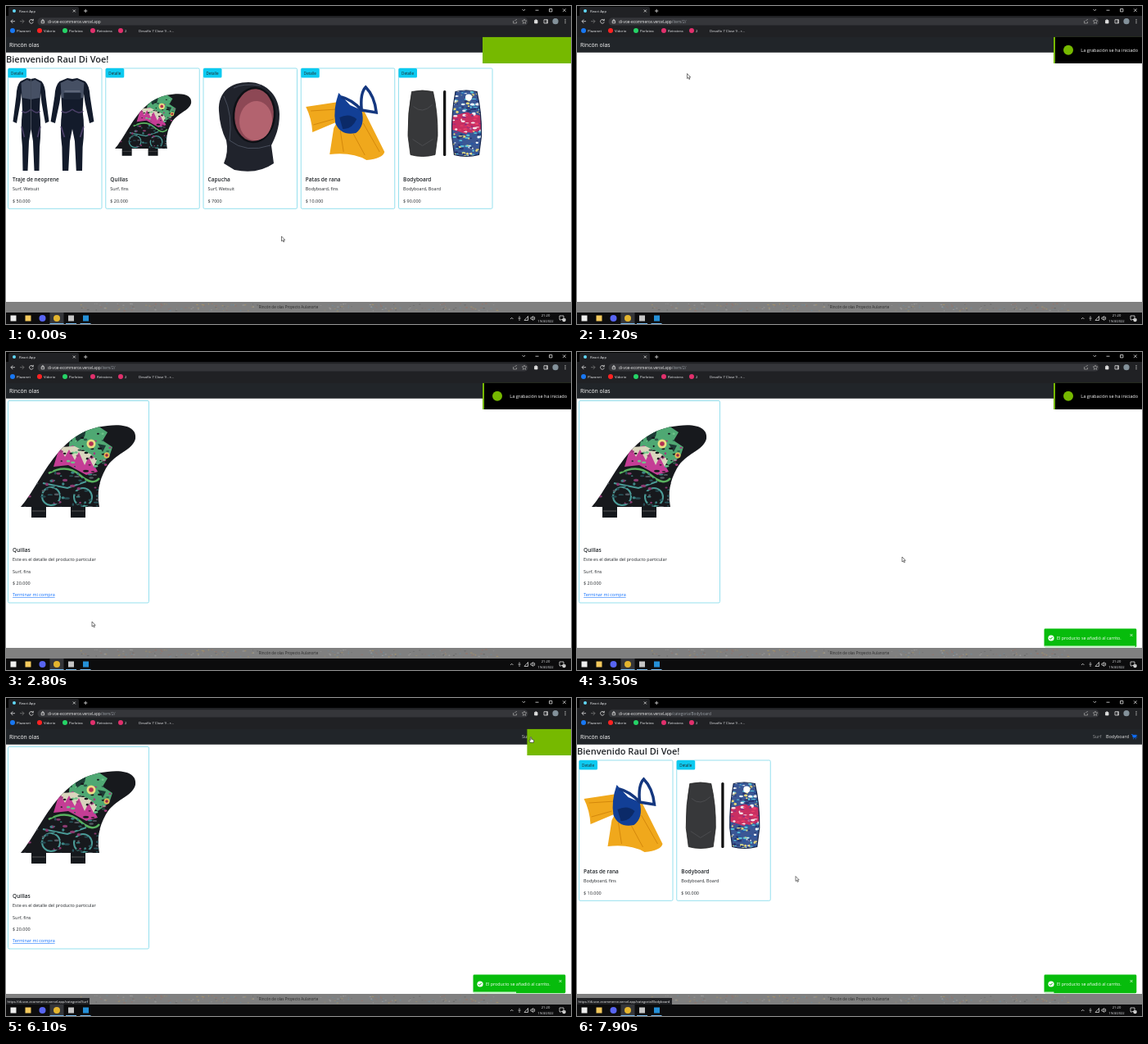
An HTML page for the animation above (8000 ms loop, 690 by 388 pixels).

```html
<!DOCTYPE html>
<html lang="es">
<head>
<meta charset="utf-8">
<title>Shop demo</title>
<style>
  html, body { margin: 0; width: 100%; height: 100%; overflow: hidden; background: #fff; }
  svg { display: block; width: 690px; height: 388px; }
  text { font-family: "Open Sans", "Noto Sans", sans-serif; white-space: pre; }
  .line { fill: none; stroke: #ddd; stroke-width: .8; }
</style>
</head>
<body>
<svg viewBox="0 0 690 388" xmlns="http://www.w3.org/2000/svg">
  <defs>
    <path id="finShape" d="M18 189C44 160 62 95 124 90C148 87 160 94 158 106C154 121 133 123 122 142C113 158 111 172 114 189Z"/>
    <clipPath id="finClip"><use href="#finShape"/></clipPath>
    <path id="board" d="M5 2Q18 -1 31 2Q37 28 36.500 56L33.500 79Q18 83 3.500 79L.5 56Q0 28 5 2Z"/>
    <clipPath id="boardClip"><use href="#board"/></clipPath>

    <g id="suitHalf">
      <path fill="#131b2b" d="M0 89L5 88L13 92Q17.500 97 18 110L22 141L17.500 143L13 118L11.500 106L10.500 128Q13 150 10.500 172L10 201H4L2.500 165L0 150Z"/>
      <path fill="#465064" d="M0 92L5 90L12 94L11 112L0 114Z"/>
      <path fill="none" stroke="#4b4068" stroke-width="1.500" d="M0 126Q7 133 11 128M11.500 147L8 160"/>
    </g>
    <g id="suit"><use href="#suitHalf"/><use href="#suitHalf" transform="scale(-1 1)"/></g>

    <g id="wetsuit">
      <use href="#suit" transform="translate(28)"/>
      <use href="#suit" transform="translate(78.500) scale(1.200 1)"/>
      <path fill="#1d2636" d="M68 106h21v8H68z"/>
      <path fill="none" stroke="#9aa3b0" stroke-width=".6" d="M69 104h19"/>
    </g>

    <g id="fin">
      <path fill="#15181c" d="M31 188h18v14H31zM79 188h18v14H79z"/>
      <path stroke="#555" d="M32 194h16M80 194h16"/>
      <use href="#finShape" fill="#17191d"/>
      <g clip-path="url(#finClip)">
        <path fill="#4fa873" d="M78 106L92 92L112 90L124 98L118 108L130 116L126 128L112 138L96 126L76 122Z"/>
        <path fill="#1d3b35" d="M84 100L98 94L96 103L86 110ZM112 112L122 114L118 122Z"/>
        <path fill="#c43d95" d="M64 120L82 114L104 132L112 146L98 150L76 138L58 140Z"/>
        <path fill="#d9d5bd" d="M66 116L72 128L77 119L84 132L89 122L96 138L101 128L107 140L111 132L104 125L84 115Z"/>
        <path fill="none" stroke="#58b15f" stroke-width="2.500" d="M52 148Q74 136 90 150T114 154"/>
        <g fill="none" stroke="#4a9b97" stroke-width="2">
          <circle cx="55" cy="176" r="11"/><circle cx="94" cy="177" r="11"/><path d="M45 160L75 166L98 158"/>
        </g>
        <g id="finArt"></g>
        <circle cx="104" cy="112" r="5.500" fill="#eadf83"/><circle cx="104" cy="112" r="2.800" fill="#b33155"/>
        <circle cx="123" cy="126" r="3.500" fill="#e5ba55"/><circle cx="123" cy="126" r="1.800" fill="#9a2448"/>
      </g>
    </g>

    <g id="hood">
      <path fill="#20232c" d="M19 128C18 104 34 93 55 93C79 93 93 112 93 132C93 149 88 160 83 170L86 192Q66 206 38 200L25 192Q31 178 28 164Q20 148 19 128Z"/>
      <ellipse cx="62" cy="133" rx="25" ry="33" transform="rotate(5 62 133)" fill="#8d4855" stroke="#0e1015" stroke-width="2.500"/>
      <ellipse cx="64" cy="140" rx="20" ry="24" transform="rotate(5 64 140)" fill="#b3636f"/>
      <path fill="none" stroke="#596070" stroke-width=".7" d="M25 110Q36 132 32 164Q52 180 82 170M37 100Q48 94 70 97"/>
    </g>

    <g id="flippers">
      <path fill="#f0a81c" d="M6 123L46 117L52 138L14 154Q13 137 6 123Z"/>
      <path fill="#f0a81c" d="M40 149L50 130L77 128L102 178Q100 186 80 188Q63 178 35 181Z"/>
      <path fill="none" stroke="#d4880b" d="M12 128L44 126M15 145L40 138M48 152L52 178M76 143L96 178M64 156L78 182"/>
      <path fill="#123f96" d="M46 106L60 121L74 127Q79 146 67 155Q49 159 42 143Q39 126 46 106Z"/>
      <path fill="none" stroke="#14377f" stroke-width="3.500" d="M49 111Q62 114 74 127L92 130Q90 110 79 99Q72 106 74 127"/>
      <path fill="#0b2a68" d="M47 136Q59 130 68 138Q62 151 51 150Z"/>
    </g>

    <g id="boards">
      <g transform="translate(11 102.500)">
        <use href="#board" fill="#37383a" stroke="#222" stroke-width=".8"/>
        <path fill="none" stroke="#4b4c4f" d="M7 20Q18 30 30 18M6 60L18 68L31 60"/>
      </g>
      <rect x="54.500" y="103" width="3.300" height="80" rx="1.500" fill="#111"/>
      <g transform="translate(64.500 102.500)">
        <g clip-path="url(#boardClip)">
          <path fill="#3b5794" d="M0 0h38v84H0z"/>
          <path fill="#c92f62" d="M0 32L19 27L38 32V48L19 54L0 48Z"/>
          <g id="dye"></g>
          <circle cx="21" cy="9" r="4" fill="#fff"/>
        </g>
        <use href="#board" fill="none" stroke="#17264b" stroke-width="1.200"/>
      </g>
    </g>
  </defs>

  <rect width="690" height="388" fill="#fff"/>
  <g id="home"></g>
  <g id="detail"></g>
  <g id="category"></g>

  <rect y="361" width="690" height="13" fill="#808080"/>
  <g id="confetti" opacity=".6"></g>

  <g id="toast">
    <rect x="570.500" y="337.500" width="112.800" height="22.700" rx="1.400" fill="#07bc0c"/>
    <circle cx="579" cy="349" r="3.600" fill="#fff"/>
    <path d="M577.200 349l1.300 1.400 2.300-2.700" fill="none" stroke="#07bc0c"/>
    <path d="M675.500 344l3 3m0-3l-3 3" stroke="#d5f5d6" stroke-width=".8"/>
    <rect id="progress" x="570.500" y="358.500" height="1.800" fill="#fff" opacity=".8"/>
  </g>

  <g id="chrome">
    <path fill="#000" d="M0 0h690v13H0z"/>
    <path fill="#202124" d="M0 12H3V3Q3 1 5 1H87Q89 1 89 3V12H690V38H0Z"/>
    <rect x="38.500" y="14.300" width="599" height="9.200" rx="4.600" fill="#35363a"/>
    <path fill="#212529" d="M0 38h690v18.800H0z"/>
    <g class="line">
      <path d="M11 18.700H6M8.300 16.300L6 18.700l2.300 2.400"/>
      <path stroke="#777" d="M17 18.700h5M19.700 16.300L22 18.700l-2.300 2.400"/>
      <path d="M33 17.500a2.400 2.400 0 1 0 .3 2M33.300 15.800v2h-2"/>
      <path d="M43.200 18.200h3.400v2.600h-3.400zM44 18v-1q.9-1.200 1.800 0v1"/>
      <path d="M81.800 4.500l3 3m0-3l-3 3M95 6h4.400M97.200 3.800v4.400"/>
      <path d="M630.500 4l1.700 1.700L634 4M646.500 5.200h4M663.500 3.500h3.400v3.400h-3.400zM680 3.400l3.700 3.700m0-3.700l-3.700 3.700"/>
      <path stroke="#999" d="M619.500 18v3h4v-2M621 18.500q1-2 3-2"/>
      <path stroke="#999" d="M633 16l.8 1.800 2 .2-1.500 1.400.4 2-1.700-1-1.700 1 .4-2-1.500-1.400 2-.2z"/>
      <path fill="#ddd" d="M645.500 17.500h1.200v-.8h1v.8h1.300v3.500h-3.500z"/>
      <path d="M657 16.700h4.500v4.300H657zM660.200 16.700v4.300"/>
    </g>
    <circle cx="671" cy="18.700" r="3.600" fill="#83919a"/>
    <g fill="#ddd"><circle cx="683" cy="16.700" r=".6"/><circle cx="683" cy="18.700" r=".6"/><circle cx="683" cy="20.700" r=".6"/></g>
  </g>
  <text x="51" y="20.600" font-size="4.740" fill="#eee">di-voe-ecommerce.vercel.app<tspan id="path" fill="#9aa0a6"></tspan></text>
  <text id="navSurf" x="630" y="49.300" font-size="5.450" fill="#fff">Surf</text>
  <text id="navBody" x="646" y="49.300" font-size="5.450" fill="#fff">Bodyboard</text>
  <path d="M677 44.500h1.300l.8 3.600h3.200l.7-2.800h-4.300" fill="#0d6efd" stroke="#0d6efd" stroke-width=".7"/>
  <path d="M679 49.700h.8m2 0h.8" stroke="#0d6efd"/>

  <path fill="#0c0c0d" d="M0 374h690v14H0z"/>
  <path fill="#35363a" d="M53.500 374h17v14h-17z"/>
  <path stroke="#76b9ed" d="M53.500 387.500h17M73 387.500h13M90.500 387.500h13"/>
  <g id="icons"></g>
  <g class="line">
    <path d="M616 382l1.700-1.700 1.700 1.700M627 378.500v3M625.500 381q1.500 2.500 3 0M627 383v1"/>
    <path d="M633 383.500h4.500v-5zM641 380h1.200l1.500-1.500v5l-1.500-1.500H641zM645 379q1.500 2 0 4M676 378h5v4.500h-3l-1 1v-1h-1z"/>
  </g>
  <circle cx="681.500" cy="383" r="2.200" fill="#ddd"/>
  <g id="labels"></g>

  <g id="status">
    <rect id="statusBox" y="366" height="8" fill="#202124"/>
    <text id="statusText" x="1.500" y="371.600" font-size="4.100" fill="#f1f1f1"></text>
  </g>

  <svg x="582" y="37.700" width="108" height="32.300" viewBox="0 0 108 32.300">
    <rect id="green" width="108" height="32.300" fill="#76b900"/>
    <g id="black">
      <rect x="2" width="106" height="32.300" fill="#000"/>
      <circle cx="18" cy="16" r="6" fill="#76b900"/>
      <text x="33.300" y="18.500" font-size="5.570" fill="#fff">La grabación se ha iniciado</text>
    </g>
  </svg>

  <g id="pointer" stroke="#222" stroke-width=".6" fill="#fff">
    <path id="arrow" d="M0 0V6L1.400 4.800L2.400 7L3.400 6.500L2.400 4.400H4.200Z"/>
    <path id="hand" d="M-.7 .3Q0-.6 .7 .3V2.800L3.400 3.500Q4 4 3.400 6.800H-.7L-2.300 4.300Q-2 3.500-.7 4.300Z"/>
  </g>
</svg>
<script>
const LOOP = 8000;
const SITE = 'https://di-voe-ecommerce.vercel.app';
const $ = id => document.getElementById(id);
const clamp = v => Math.max(0, Math.min(1, v));
const phase = (t, from, to) => clamp((t - from) / (to - from));
const smooth = p => p * p * (3 - 2 * p);
const easeOut = p => 1 - (1 - p) ** 3;
const show = (id, on) => $(id).setAttribute('display', on ? 'inline' : 'none');
const move = (id, x, y = 0) => $(id).setAttribute('transform', `translate(${x} ${y})`);

const label = (x, y, size, text, fill = '#212529', extra = '') =>
  `<text x="${x}" y="${y}" font-size="${size}" fill="${fill}" ${extra}>${text}</text>`;
const frame = (w, y, h) =>
  `<rect x="0" y="${y}" width="${w}" height="${h}" rx="1.500" fill="#fff" stroke="#7bd9ea" stroke-width=".8"/>`;

const products = [
  ['wetsuit', 'Traje de neoprene', 'Surf, Wetsuit', '50.000'],
  ['fin', 'Quillas', 'Surf, fins', '20.000'],
  ['hood', 'Capucha', 'Surf, Wetsuit', '7000'],
  ['flippers', 'Patas de rana', 'Bodyboard, fins', '10.000'],
  ['boards', 'Bodyboard', 'Bodyboard, Board', '90.000']
];

function card([art, name, tags, price], i) {
  const fit = art === 'fin' ? 'transform="translate(-.7 47.400) scale(.665 .670)"' : '';
  return `<g transform="translate(${2.5 + 119.25 * i})">` + frame(114.5, 76, 171.3) +
    `<use href="#${art}" ${fit}/>` +
    '<rect y="76" width="22.500" height="11.500" rx="1.500" fill="#0dcaf0"/>' +
    label(3.6, 83.5, 4.55, 'Detalle') +
    label(5.6, 214.2, 6.5, name, '#212529', 'font-weight="600"') +
    label(5.6, 225.2, 5.45, tags) + label(5.6, 239.6, 5.45, '$ ' + price) + '</g>';
}

const heading = label(0, 68.6, 11, 'Bienvenido Raul Di Voe!', '#212529', 'font-weight="600"');
$('home').innerHTML = heading + products.map(card).join('');
$('category').innerHTML = heading + `<g id="results">${products.slice(3).map(card).join('')}</g>`;
$('detail').innerHTML = '<g transform="translate(2.500)">' +
  `<g id="tall">${frame(172, 59.5, 283)}` +
  label(5.6, 298.3, 5.45, '-    1    +') +
  '<rect x="5.600" y="322" width="160" height="13" rx="1.500" fill="#0dcaf0"/>' +
  label(85, 330.4, 5.45, 'Agregar al carrito', '#212529', 'text-anchor="middle"') + '</g>' +
  `<g id="short">${frame(172, 59.5, 246.5)}` +
  label(5.6, 298.3, 5.45, 'Terminar mi compra', '#0d6efd', 'text-decoration="underline"') + '</g>' +
  '<use href="#fin" x="-2.500"/>' +
  label(5.6, 244.2, 6.5, 'Quillas', '#212529', 'font-weight="600"') +
  label(5.6, 255.2, 5.45, 'Este es el detalle del producto particular') +
  label(5.6, 269.6, 5.45, 'Surf, fins') + label(5.6, 284, 5.45, '$ 20.000') + '</g>';

let seed = 7;
const rand = () => (seed = seed * 16807 % 2147483647) / 2147483647;
const pick = list => list[Math.floor(rand() * list.length)];
const specks = (n, x, y, w, h, size, colors) => Array.from({ length: n }, () =>
  `<ellipse cx="${x + rand() * w}" cy="${y + rand() * h}" rx="${size * (.5 + rand())}" ry="${size * (.3 + rand() * .5)}" fill="${pick(colors)}"/>`).join('');

$('finArt').innerHTML =
  specks(90, 22, 140, 94, 50, 2.4, ['#3d8585', '#275158', '#545b63', '#8a3a70', '#17191d', '#17191d']) +
  specks(45, 66, 96, 62, 44, 2, ['#17191d', '#2b5a48', '#6fc48a', '#17191d', '#a13c7d']);
const burst = ['#58c4d9', '#2757a3', '#e8d878', '#26356f', '#eef3f6'];
$('dye').innerHTML = specks(90, 0, 0, 38, 32, 2, burst) + specks(90, 0, 50, 38, 34, 2, burst) +
  specks(50, 0, 30, 38, 22, 1.8, ['#f5e7ec', '#e8406a', '#8d2d82', '#c92f62']);
const tints = ['#b39b63', '#6f8d9e', '#a5a5a5', '#606060', '#9b7165'];
$('confetti').innerHTML = specks(95, 90, 363, 218, 9, 1.1, tints) + specks(95, 384, 363, 220, 9, 1.1, tints);

const dot = (x, y, r, fill) => `<circle cx="${x}" cy="${y}" r="${r}" fill="${fill}"/>`;
const tile = (x, fill) => `<rect x="${x - 3.5}" y="377.500" width="7" height="7" fill="${fill}"/>`;
$('icons').innerHTML = dot(10, 6, 2, '#61dafb') + dot(8, 30, 3, '#1877f2') + dot(41, 30, 3, '#f22') +
  dot(72, 30, 3, '#25d366') + dot(106, 30, 3, '#e1306c') + dot(140, 30, 3, '#e1306c') +
  tile(9, '#eee') + tile(27, '#f4c95d') + dot(44.5, 381, 4, '#5865f2') + dot(62, 381, 4, '#e4b52e') +
  tile(79.5, '#c5c5c5') + tile(97.5, '#2490d8');

const pale = '#e8eaed';
const middle = 'text-anchor="middle"';
$('labels').innerHTML = label(16, 7.7, 4.3, 'React App', pale) +
  [[13, 'Plazanet'], [46, 'Vidorio'], [77, 'Parlotea'], [111, 'Retratera'], [145, '2'], [162, 'Desafío 7 Clase 9 - r...']]
    .map(([x, text]) => label(x, 31.6, 4.3, text, pale)).join('') +
  label(4, 49.8, 6.86, 'Rincón olas', '#fff') +
  label(345, 369.2, 4.55, 'Rincón de olas Proyecto Aulanorte', '#292929', middle) +
  label(659, 379.3, 4.1, '21:20', pale, middle) + label(659, 385.8, 4.1, '19/4/2022', pale, middle) +
  label(681.5, 384.2, 3, '1', '#222', middle) + label(682.5, 49.2, 4.5, '1', '#0d6efd') +
  label(586, 351, 5.35, 'El producto se añadió al carrito.', '#fff', 'id="toastText"');
$('toast').append($('toastText'));

// Time, x, y of the pointer tip
const route = [
  [0, 336.5, 281], [250, 336.5, 281], [900, 130, 81], [1100, 132, 82], [1200, 134.5, 82.5],
  [1800, 140, 180], [2550, 105, 329], [2800, 105, 329], [3500, 397, 250], [4450, 670, 93],
  [5000, 672, 74], [5400, 665, 54], [5750, 641, 48], [6500, 641, 47], [6900, 650, 45],
  [7300, 650, 45], [7850, 267, 217.5], [LOOP, 267, 217.5]
];
const bounce = [[0, 1078], [.6, -9], [.75, 3.6], [.9, -1.8], [1, 0]];

function along(points, t, ease) {
  const i = Math.max(1, points.findIndex(p => p[0] >= t));
  const [a, b] = [points[i - 1], points[i]];
  const p = ease(phase(t, a[0], b[0]));
  return a.slice(1).map((v, k) => v + (b[k + 1] - v) * p);
}

function render(t) {
  const onHome = t < 1070, onCategory = t >= 7350;
  show('home', onHome);
  show('detail', t >= 1600 && !onCategory);
  show('tall', t < 2760);
  show('short', t >= 2760);
  show('category', onCategory);
  show('results', t >= 7600);
  $('path').textContent = onHome ? '' : onCategory ? '/categoria/Bodyboard' : '/item/2/';

  show('toast', t >= 2750);
  move('toast', along(bounce, phase(t, 2750, 3450), easeOut)[0]);
  $('progress').setAttribute('width', 112.8 * (1 - phase(t, 3430, 8430)));

  const overSurf = t >= 5700 && t < 6750, overBody = t >= 6750 && t < 7400;
  $('navSurf').setAttribute('opacity', overSurf ? .75 : .55);
  $('navBody').setAttribute('opacity', onCategory ? .9 : overBody ? .75 : .55);
  show('status', t >= 5850);
  $('statusText').textContent = SITE + '/categoria/' + (t < 6800 ? 'Surf' : 'Bodyboard');
  $('statusBox').setAttribute('width', t < 6800 ? 102 : 116);

  move('black', 108 * (1 - easeOut(phase(t, 50, 550)) + smooth(phase(t, 5450, 5850))));
  move('green', 108 * smooth(phase(t, 5900, 6300)));

  const [x, y] = along(route, t, smooth);
  const linked = overSurf || overBody || (t >= 850 && t < 1100);
  move('pointer', x, y);
  show('arrow', !linked);
  show('hand', linked);
}

const start = performance.now();
function tick(now) {
  render(Math.max(0, now - start) % LOOP);
  requestAnimationFrame(tick);
}
render(0);
requestAnimationFrame(tick);
</script>
</body>
</html>
```
